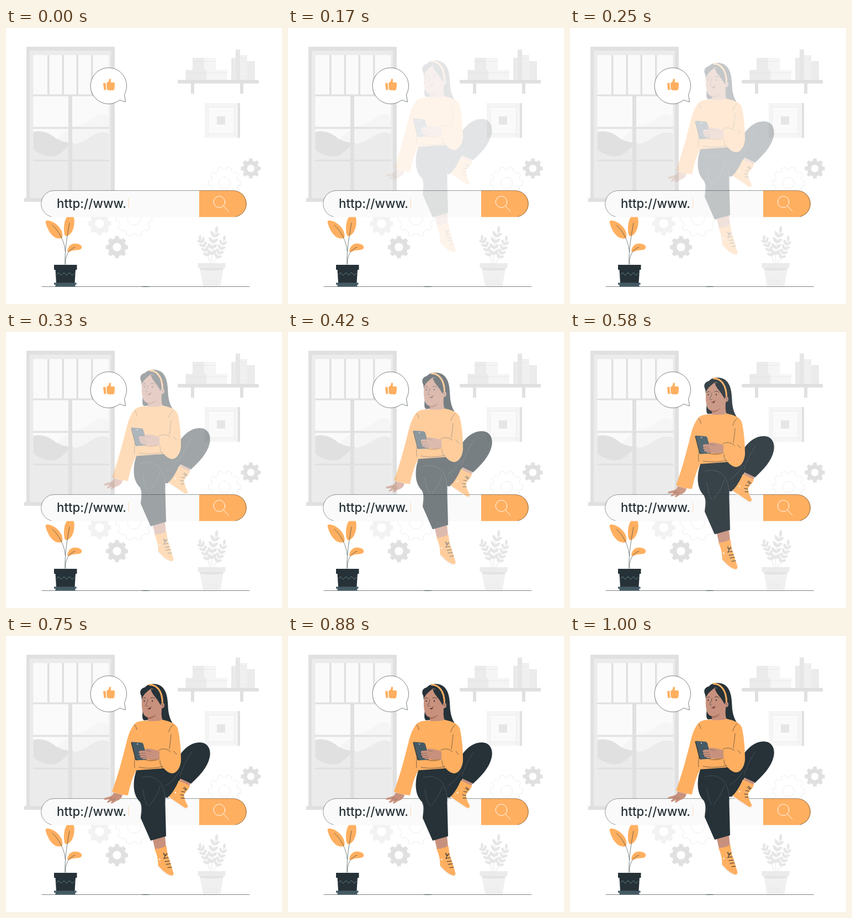
An HTML page that plays this animation: 500 px wide and 500 px high, repeating every 1040 ms.

```html
<!DOCTYPE html>
<html lang="en">
<head>
<meta charset="utf-8">
<title>Search bar</title>
<style>
  html, body { margin: 0; width: 100%; height: 100%; overflow: hidden; background: #fff; }
  svg { display: block; width: 100%; height: 100%; }
  .a { fill: #e0e0e0; } .b { fill: #ebebeb; } .c { fill: #f5f5f5; } .d { fill: #fafafa; }
  .o { fill: #ffaf60; } .n { fill: #263238; } .s { fill: #c8917d; } .g { fill: #455a64; }
  .w { fill: #fff; }
  .ln { fill: none; stroke: #263238; stroke-linecap: round; stroke-linejoin: round; }
  .fold { fill: none; stroke: #55666e; stroke-linecap: round; }
  .pale { fill: none; stroke: #e0e0e0; }
  text { font: 500 22.3px Inter, sans-serif; fill: #263238; }
</style>
</head>
<body>
<svg viewBox="0 0 500 500" stroke-width=".6">
  <!-- window -->
  <path class="a" d="M37 34H197V309H37ZM33 308H201V315H33Z"/>
  <path class="b" d="M43 41H190V308H43Z"/>
  <path class="d" d="M49.500 49H186.500V300H49.500Z"/>
  <path class="c" d="M85 208C102 196 112 178 133 176C152 174 158 156 174 156C180 156 184 159 186.500 162V240H85Z"/>
  <path class="a" d="M49.500 188C62 185 76 188 88 198C98 206 110 207 123 209V236H49.500Z"/>
  <path class="b" d="M49.500 220C62 230 76 235 91 231C103 227 108 213 124 210C146 207 158 188 176 189C181 189 184 190 186.500 192V300H49.500Z"/>
  <path class="a" d="M75 49h3.500v72h-3.500zM101.500 49h3.500v72h-3.500zM127.500 49h3.500v72h-3.500zM154 49h3.500v72h-3.500zM49 120.500H187v3H49zM113 123h7v180h-7zM49 179.500H187v3H49zM49 238.500H187v3H49z"/>

  <!-- shelf -->
  <path class="a" d="M311 94H458V100.500H311ZM335 100h6v19h-6zM424 100h6v19h-6z"/>
  <path class="b" d="M325.500 76H363V94H325.500ZM338 54H359.500V76H338Z"/>
  <path class="c" d="M363 76H401V94H363ZM359.500 54H380V76H359.500Z"/>
  <path class="pale" d="M325.500 81H401M338 60H380"/>
  <path class="b" d="M408 54h8v40h-8zM437 60h14v34h-14z"/>
  <path fill="#e6e6e6" d="M416 39h8v55h-8z"/>
  <path fill="#f0f0f0" d="M424 49h13v45h-13z"/>
  <path class="pale" d="M416 46h8M416 50h8M426 55h9M426 88h9M411 56v36"/>

  <!-- picture -->
  <path class="a" d="M419 136h5v63h-5z"/>
  <path class="c" d="M360 136h60v63h-60z"/>
  <path fill="#fafafa" stroke="#e6e6e6" d="M366.500 143.500h47v48h-47z"/>
  <path class="pale" stroke-opacity=".7" d="M360 136l6.500 7.500M420 136l-6.500 7.500M360 199l6.500-7.500M420 199l-6.500-7.500"/>
  <path fill="#e6e6e6" d="M382 160h15v15h-15z"/>

  <g id="gears"></g>

  <!-- pale plant -->
  <g id="sprigs"></g>
  <path class="b" d="M347 426H398L397 435H348Z"/>
  <path fill="#f0f0f0" d="M351 435H394L388.500 468H357Z"/>
  <path fill="#e3e3e3" d="M351 435H394L393.500 438Q370 441 351.500 438Z"/>
  <path class="pale" d="M359 460l4-5 4 5 4-5 4 5 4-5 5 5M360 465l4-3 4 3 4-3 4 3 4-3 4 3"/>

  <!-- floor -->
  <path class="ln" d="M65 468.500H441"/>
  <ellipse class="n" cx="253" cy="468.600" rx="8" ry=".5"/>

  <!-- orange plant -->
  <path class="o" d="M72 353C70 347 79 348 86 352C96 358 103 367 102.500 378C102 383 94 382 88 379C80 374 74 362 72 353Z"/>
  <path class="o" d="M105 363C105 350 110 338 117 338C124 338 125 350 122.500 361C120 371 114 377 109 377C105.500 376 105 370 105 363Z"/>
  <path class="o" d="M111 405C112 396 117 390 126 390.500C134 391 139 395 137 399C134 403 128 402 122 403C117 404 114 407 111 405Z"/>
  <path class="ln" d="M107 428C106 400 112 372 115 353M107.500 405C106 386 96 368 84 357M107.500 428C107 414 112 402 125 397"/>
  <path class="n" d="M87 429H128.500V438H126L124.500 462H91L89.500 438H87Z"/>
  <path class="g" d="M87 461.500H127.500V465H125L126 468.500H89L90 465H87Z"/>
  <path fill="none" stroke="#78909c" stroke-width=".8" d="M91 447l4-4 5 5 5-5 5 5 5-5 5 5 4-4"/>

  <!-- search bar -->
  <path class="d" d="M88 294.500H350V342.500H88A24 24 0 0 1 88 294.500Z"/>
  <path class="o" d="M350 294.500H412A24 24 0 0 1 412 342.500H350Z"/>
  <path class="ln" stroke-width=".5" d="M82 341.800A24 24 0 0 1 88 294.500H412A24 24 0 0 1 416 342"/>
  <text x="92" y="326">http://www.</text>
  <path fill="none" stroke="#ffaf60" stroke-opacity=".7" d="M222.500 308V327"/>
  <g fill="none" stroke="#fff" stroke-width="1" stroke-linecap="round">
    <circle cx="386.500" cy="315" r="10.300"/><path d="M393.800 322.300L403 332"/>
  </g>

  <!-- bubble -->
  <path fill="#fff" stroke="#263238" stroke-linejoin="round" d="M206 130.500A32.700 32.700 0 1 1 214.500 120.500L216.500 134Z"/>
  <path class="o" d="M176 100L180.500 99.500L181.500 112L177.500 112.500ZM182 100C185 98 187 96 187 92.500C188 91 190.500 92 190.200 95L189.500 98.500L196 98.700Q197.500 99.500 197 102L196.500 110Q196 112.800 193.500 113L186 112.800L183 111.500Z"/>

  <g id="woman">
    <!-- hair behind -->
    <path class="n" d="M245 106C241 99 244 93 252 91C258 84 272 83 281 89C291 96 293 111 293.500 126C294 142 299 153 304 159C293 159 283 155 278 149L250 151C246 149 247 141 248 132Z"/>
    <!-- raised leg -->
    <path class="n" d="M262 242L300 238L316 212C325 200 337 191 351 191C366 191 372 204 369 218C365 237 350 252 335 266L316 257L300 291L288 291L262 285Z"/>
    <path class="fold" d="M336 209C328 221 320 236 315 252M314 244C306 254 302 264 288 270"/>
    <path class="s" d="M317 257L334 265L331 274L312 266Z"/>
    <path fill="#f0f0f0" d="M295 288L293.500 291L324 311.500L328.500 311.500L329 307Z"/>
    <path class="o" d="M313 260L333 269.500C331 278 323 281 322.500 288C324 297 328 302 329.500 307Q328 311 323.500 309L294.500 289.500C300 284 308 273 313 260Z"/>
    <path class="ln" stroke-width="1" d="M321 275C323 270 327 273 323 276C328 274 331 276 324 278M318 280L324 281M316 286L322 287M317 292L323 292"/>
    <circle class="w" cx="307" cy="282" r="1.300"/>

    <!-- front leg -->
    <path class="s" d="M265.500 366L288 361L290 381L270 385Z"/>
    <path fill="#f0f0f0" d="M275 412L275 417L289 430L300 434L304 430Z"/>
    <path class="o" d="M269 384C277 384 284 382 290.500 378.500C292 386 292 394 296 403L303.500 428Q303 433 299 432C289 429 282 421 275.500 414C276 403 273 393 269 384Z"/>
    <path class="ln" stroke-width="1" d="M288 397C283 391 286 389 288.500 396C292 389 294 394 288 397L286 402M286 401L294 400M288 407L296 406M290 412L298 411M293 418L300 417"/>
    <circle class="w" cx="278.500" cy="403" r="1.300"/>
    <path class="n" d="M237 238L286 236C298 244 287 264 288 285L290 361L262 369L244 328C245 317 247 306 243 299C231 287 230 270 233 253Z"/>
    <path class="fold" d="M245 255C262 249 277 257 283 270C287 278 288 287 289 298M248 276C250 289 252 299 257 306M279 270C277 285 266 296 260 306M243 300C246 306 247 312 246 320"/>

    <!-- neck and blouse -->
    <path class="s" d="M257 140L283 122C281 138 281 146 285 153C278 162 259 162 254 154C258 151 258 147 257 140Z"/>
    <path class="o" d="M254 151.500C263 153 276 153 284 150C296 153 307 156 311 165C314 176 317 198 317 224C316 238 308 248 300 247C294 246 289 242 286 238L236.500 241.500C230 251 225 268 221 287C210 286 201 284 192 280C203 251 211 220 219 188C223 172 229 160 236 155C242 152 249 151.500 254 151.500Z"/>
    <path class="ln" d="M233 159C235 162 237 165 237 168M303 159C299 162 296 167 295 172M299 177C298 188 297 196 296 203M235 211C233 221 232 230 233 237M277 205C285 201 293 203 298 208M304 207L309 213M279 224C278 234 287 242 293 245M241 236C254 239 270 238 284 235"/>
    <path fill="#b97f48" d="M245 219C256 226 268 222 279 219L278 222C268 226 254 227 245 219Z"/>

    <!-- phone hand -->
    <path class="g" d="M228 190L246 191.500Q248 192 248.700 194L256 220Q256 222 254 222.500L238 223.500Q236 223.500 235 221Z"/>
    <path class="n" d="M228 190L226.500 191.500L234 221Q235 224 238 223.500L235 220Z"/>
    <circle class="w" cx="238" cy="194" r=".9"/>
    <path class="s" d="M278 207C270 205 263 202 255 202.500C250 203 251 205 254 206L244 206C239 207 240 210 243 211C240 212 241 215 244 215C242 217 243 219 246 219C247 221 250 222 256 221C264 224 272 221 278 222Z"/>
    <path class="ln" stroke-width=".4" d="M243 211L252 210.500M244 215L253 214.500M246 219L254 218M254 206C258 206 260 207 262 208"/>

    <!-- resting hand -->
    <path class="s" d="M195 282L211 286C210 291 207 294 203 296C198 297 195 301 191 302C189 301 191 298 193 296C189 298 186 301 183 300C182 298 186 296 188 294C184 294 180 296 177 294C177 291 183 291 188 289C192 288 194 286 195 282Z"/>
    <path class="ln" stroke-width=".4" d="M188 294L193 291M193 296L198 293"/>

    <!-- head -->
    <path class="s" d="M262 93C254 96 248 101 246.500 110C245 123 246 134 250 141C254 147 263 147 270 142C277 137 282 132 283 126L282 105C278 98 270 94 262 93Z"/>
    <path fill="#a9705e" d="M256 145C262 146 267 144 272 140C269 146 263 149 257 148.500Z"/>
    <path class="n" d="M263 93C272 95 279 103 280.500 119L284 121L288 113L282 94L268 87C257 86 246 94 244 104L247 110C250 103 257 98 263 93Z"/>
    <path class="n" d="M262 94C265 105 272 109 278 120L282 128L284 112L275 96Z"/>
    <ellipse class="s" cx="283.500" cy="124" rx="3.500" ry="5"/>
    <path fill="none" stroke="#ffaf60" stroke-width="3" d="M259 86.500C274 86 283 99 283.500 119"/>
    <path class="ln" stroke-width=".9" d="M248.500 112C250 110 252 110 253 111M262 111C265 109 268 110 270 112"/>
    <path class="ln" d="M257 113C257 118 254 121 253 124C254 125.500 255 125.500 257 125M281 122C283 121 285 123 284 126"/>
    <ellipse class="n" cx="250.500" cy="116" rx="1" ry="1.500"/>
    <ellipse class="n" cx="265" cy="116" rx="1" ry="1.500"/>
    <path fill="#7d3f3a" d="M257 129.500C259 129.500 261 128.500 262.500 127C263 129.500 261.500 131.500 259.500 131.500Z"/>
    <path class="ln" stroke-width=".5" d="M256 130C259 129.500 262 128.500 263.500 126"/>
  </g>
</svg>
<script>
  const make = (parent, tag, attrs) => {
    const el = document.createElementNS('http://www.w3.org/2000/svg', tag);
    for (const key in attrs) el.setAttribute(key, attrs[key]);
    document.getElementById(parent).append(el);
  };

  const ring = (x, y, r) => `M${x - r} ${y}a${r} ${r} 0 1 0 ${2 * r} 0a${r} ${r} 0 1 0 ${-2 * r} 0Z`;

  function gearPath(x, y, outer, root, hole, teeth) {
    const step = 2 * Math.PI / teeth, points = [];
    for (let i = 0; i < teeth; i++) {
      for (const [r, part] of [[root, -.29], [outer, -.2], [outer, .2], [root, .29]]) {
        const angle = (i + part) * step;
        points.push(`${(x + r * Math.cos(angle)).toFixed(2)} ${(y + r * Math.sin(angle)).toFixed(2)}`);
      }
    }
    return `M${points.join('L')}Z${ring(x, y, hole)}`;
  }

  const solid = (fill, ...shape) =>
    make('gears', 'path', { d: gearPath(...shape), fill, 'fill-rule': 'evenodd', 'stroke-linejoin': 'round', stroke: fill });
  const outline = (...shape) =>
    make('gears', 'path', { d: gearPath(...shape), fill: 'none', stroke: '#e6e6e6', 'stroke-width': .7 });

  solid('#e0e0e0', 443.5, 254.5, 18, 14, 7, 8);
  solid('#f2f2f2', 169.5, 354.5, 21, 17, 8.5, 8);
  solid('#e0e0e0', 201, 397, 20, 16, 8, 8);
  outline(396, 281, 29.5, 25, 10.5, 10);
  outline(232, 345, 33, 28, 12, 10);

  // Each sprig: curve from root through bend to tip, with paired leaves.
  function sprig(root, bend, tip, pairs, size) {
    make('sprigs', 'path', { d: `M${root}Q${bend} ${tip}`, fill: 'none', stroke: '#e0e0e0', 'stroke-width': .8 });
    const at = (u, i) => (1 - u) ** 2 * root[i] + 2 * u * (1 - u) * bend[i] + u * u * tip[i];
    const leaf = (x, y, turn) => make('sprigs', 'ellipse', {
      cx: size, rx: size, ry: size * .46, fill: '#e6e6e6', transform: `translate(${x} ${y}) rotate(${turn})`
    });
    for (let i = 0; i < pairs; i++) {
      const u = .25 + .7 * i / pairs, x = at(u, 0), y = at(u, 1);
      const turn = Math.atan2(at(u + .05, 1) - y, at(u + .05, 0) - x) * 180 / Math.PI;
      leaf(x, y, turn - 42);
      leaf(x, y, turn + 42);
    }
    leaf(tip[0], tip[1] + size, -85);
  }
  sprig([373, 426], [370, 395], [381, 365], 4, 6);
  sprig([370, 426], [362, 398], [351, 380], 4, 5);
  sprig([376, 426], [388, 408], [395, 381], 4, 5);

  // Overshooting ease: cubic-bezier(.36, -.01, .5, 1.38)
  const curve = (u, a, b) => 3 * u * (1 - u) ** 2 * a + 3 * u * u * (1 - u) * b + u ** 3;
  function ease(x) {
    let low = 0, high = 1;
    for (let i = 0; i < 30; i++) {
      const mid = (low + high) / 2;
      if (curve(mid, .36, .5) < x) low = mid; else high = mid;
    }
    return curve(low, -.01, 1.38);
  }

  const LOOP = 1040, FPS = 24, ENTER = 4, DROP = 30;
  const stepTime = k => Math.round(k * 100 / FPS) * 10;
  const woman = document.getElementById('woman');
  const start = performance.now();

  function draw() {
    const time = (performance.now() - start) % LOOP;
    let step = 0;
    while (step < FPS && stepTime(step + 1) <= time) step++;
    // Each step shows the pose at its middle.
    const p = ease((step + .5) / FPS);
    woman.style.opacity = step < ENTER ? 0 : Math.min(1, p);
    woman.setAttribute('transform', `translate(0 ${DROP * (p - 1)})`);
    requestAnimationFrame(draw);
  }
  draw();
</script>
</body>
</html>
```
